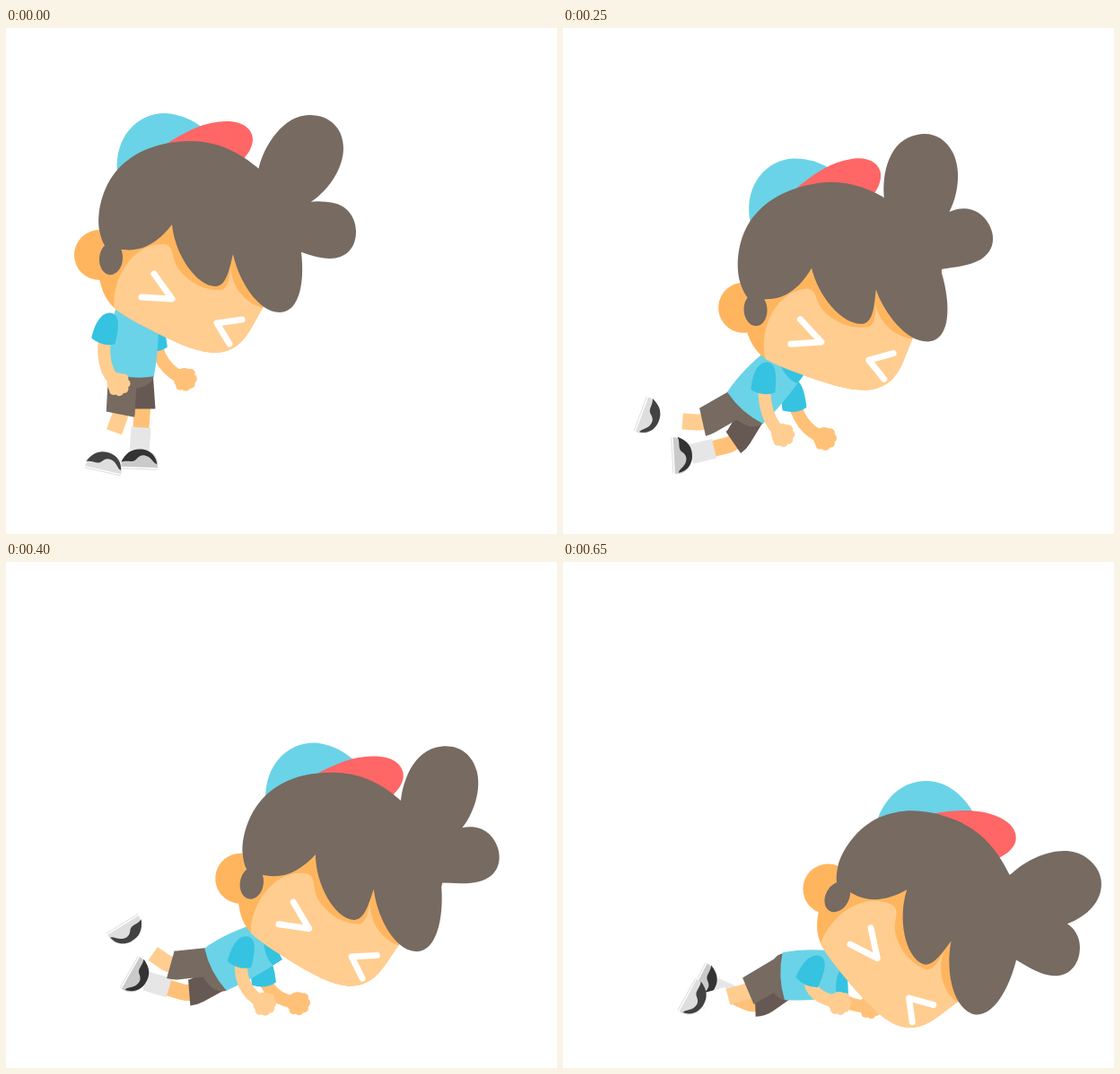
An HTML page with a canvas for the animation above (0.75 s loop, 614 px wide and 564 px high).

```html
<!DOCTYPE html>
<html lang="en">
<head>
<meta charset="utf-8">
<title>Falling boy</title>
<style>
  html, body { margin: 0; width: 100%; height: 100%; overflow: hidden; background: #fff; }
  canvas { display: block; }
</style>
</head>
<body>
<canvas id="stage" width="614" height="564"></canvas>
<script>
const ctx = document.getElementById('stage').getContext('2d');
const LOOP = 750, STEP = 50, LANDING = 450, END = 650;
const { sin, cos, atan2, min, max, PI } = Math;
const RAD = PI / 180;

const HAIR = '#766a61', SHORTS_DARK = '#665852';
const SKIN = '#ffcd90', SKIN_BACK = '#ffc177', SKIN_SHADE = '#ffb55e';
const BLUE = '#6ad3e7', BLUE_DARK = '#35c3e1', RED = '#ff6666';

const SHAPES = {
  capBlue: 'M124 162C120 123 145 95 177 95C194 96 207 102 219 111L200 140Z',
  capRed: 'M176 131C200 115 222 104 246 104C266 104 275 114 275 125C274 134 270 140 263 148L207 145Z',
  face: 'M102 240C101 275 105 299 122 313C137 325 155 333 172 342C195 353 215 362 234 362C266 360 272 334 288 309L260 225L130 200Z',
  faceLight: 'M121 313C117 282 140 240 175 241C190 242 182 257 195 272C207 286 224 293 240 292C248 290 250 277 250 262C250 284 262 305 286 312C272 334 266 360 234 362C215 362 195 353 172 342C155 333 137 325 121 313Z',
  hair: 'M283 158C260 138 235 126 205 126C168 127 143 138 125 157C106 178 101 208 104 225C106 236 109 242 113 246L131 247C154 250 172 236 185 219C188 252 212 288 234 288C246 287 249 268 253 252C259 281 281 317 305 317C328 317 334 280 328 243C334 210 325 185 283 158Z',
  tuftBig: 'M281 159C287 130 310 97 338 97C362 97 376 113 376 134C376 156 360 180 341 193L310 215L270 190Z',
  tuftSmall: 'M325 196C343 192 354 193 365 195C380 198 390 211 390 227C390 246 378 257 361 257C350 257 338 253 327 249L300 240L300 200Z',
  shirt: 'M-24 -8L24 -8C27 18 28 42 26 63Q0 70 -27 63C-30 42 -29 20 -24 -8Z',
  collar: 'M-18 -8L24 -8L25 4C14 8 -3 4 -18 -8Z',
  sleeve: 'M-14 15C-14 -4 -8 -17 2 -17C11 -17 14 -5 13 16Q0 22 -14 15Z',
  shoe: 'M-20 19C-19 8 -10 -1 3 -1C16 0 22 9 21 19Z',
  shoeTop: 'M-20 14C-15 3 -8 -2 3 -1C13 0 19 7 20 15C16 14 15 10 10 7C4 4 0 6 -3 10C-7 15 -13 11 -20 14Z'
};
for (const name in SHAPES) SHAPES[name] = new Path2D(SHAPES[name]);

function fill(name, color) {
  ctx.fillStyle = color;
  ctx.fill(SHAPES[name]);
}

function oval(x, y, rx, ry, color, turn = 0) {
  ctx.fillStyle = color;
  ctx.beginPath();
  ctx.ellipse(x, y, rx, ry, turn * RAD, 0, 2 * PI);
  ctx.fill();
}

function stroke(width, color, cap, trace) {
  ctx.strokeStyle = color;
  ctx.lineWidth = width;
  ctx.lineCap = cap;
  ctx.lineJoin = 'round';
  ctx.beginPath();
  trace();
  ctx.stroke();
}

function line(width, color, cap, ...points) {
  stroke(width, color, cap, () => points.forEach(p => ctx.lineTo(...p)));
}

function at([x, y], degrees, draw) {
  ctx.save();
  ctx.translate(x, y);
  ctx.rotate(degrees * RAD);
  draw();
  ctx.restore();
}

function turnAbout(x, y, degrees, draw) {
  at([x, y], degrees, () => { ctx.translate(-x, -y); draw(); });
}

// A point given in the frame of a joint that is turned by some degrees.
function from([x, y], degrees, dx, dy) {
  const c = cos(degrees * RAD), s = sin(degrees * RAD);
  return [x + dx * c - dy * s, y + dx * s + dy * c];
}

function leg(hip, { thigh, shin, thighAngle, shinAngle, footAngle, width, skin, sock, shoe, top, shorts }) {
  const knee = from(hip, thighAngle, 0, thigh);
  const ankle = from(knee, shinAngle, 0, shin);
  const part = (width, color, start, length) => {
    ctx.setLineDash([0, start, length, 999]);
    stroke(width, color, 'butt', () => {
      ctx.moveTo(...hip);
      ctx.arcTo(...knee, ...ankle, 22);
      ctx.lineTo(...ankle);
    });
    ctx.setLineDash([]);
  };
  part(18, skin, 0, 999);
  part(22, sock, thigh + shin * 0.45, 999);
  at(ankle, footAngle, () => {
    fill('shoe', shoe);
    fill('shoeTop', top);
    line(1, '#dedede', 'butt', [-20, 21], [21, 21]);
  });
  part(width, shorts, 0, thigh);
}

function arm(shoulder, upper, upperAngle, fore, foreAngle, skin) {
  const elbow = from(shoulder, upperAngle, 0, upper);
  const hand = from(elbow, foreAngle, 0, fore);
  stroke(14, skin, 'round', () => {
    ctx.moveTo(...shoulder);
    ctx.quadraticCurveTo(...elbow, ...hand);
  });
  oval(...hand, 12, 12, skin);
  for (let a = -40; a <= 120; a += 40) oval(...from(hand, a, 9, 0), 5, 5, skin);
  at(shoulder, upperAngle, () => fill('sleeve', BLUE_DARK));
}

function drawHead(center, angle, tuftBig, tuftSmall) {
  at(center, angle, () => {
    ctx.translate(-192.4, -271);
    fill('capBlue', BLUE);
    fill('capRed', RED);
    oval(104, 253, 28, 28, SKIN_SHADE);
    fill('face', SKIN_SHADE);
    fill('faceLight', SKIN);
    turnAbout(300, 178, tuftBig, () => fill('tuftBig', HAIR));
    turnAbout(302, 219, tuftSmall, () => fill('tuftSmall', HAIR));
    fill('hair', HAIR);
    oval(117, 257, 13, 18, HAIR, 5);
    line(7, '#fff', 'round', [165, 274], [185, 302], [151, 300]);
    line(7, '#fff', 'round', [263, 325], [235, 329], [249, 352]);
  });
}

function drawScene(t) {
  ctx.fillStyle = '#fff';
  ctx.fillRect(0, 0, 614, 564);

  // The boy falls until the landing, then settles on the ground.
  const fall = min(t / LANDING, 1);
  const settle = sin(max(0, (t - LANDING) / (END - LANDING)) * PI / 2);
  const sway = sin(2 * PI * fall);
  const arc = sin(PI * fall);
  const lag = sin(2 * fall);
  const swing = sin(fall * PI / 2) ** 1.4;
  const kick = fall ** 0.7;
  const tuck = fall ** 4;

  const head = [192.4 + 177 * fall ** 0.97 + 4 * sway, 271 + 132 * fall ** 1.75 + 13 * settle];
  const tilt = 57 * fall * (fall - 0.79) + 11.4 * settle;
  const neck = from(head, tilt, -47 - 7 * lag + 15 * settle, 52 + 12 * settle);
  const lean = 6 + 66.5 * fall + 4 * sway + 15 * settle;
  const onTorso = (x, y) => from(neck, lean, x, y);

  arm(onTorso(21 + 9 * arc - 15 * settle, 17 - 8 * settle),
    39 - 8 * tuck, -9, 30 + 7 * tuck, -70 - 30 * tuck - 6 * sway + 8 * settle, SKIN_BACK);
  leg(onTorso(10, 60), {
    thigh: 41, thighAngle: -4 + 76 * fall ** 1.3 - 17 * settle,
    shin: 46 + 6 * kick, shinAngle: 4 + 105 * swing + 6 * settle,
    footAngle: 2 + 128 * kick - 13 * settle,
    width: 29, skin: SKIN_BACK, sock: '#e6e6e6', shoe: '#cacaca', top: '#333', shorts: SHORTS_DARK
  });
  oval(...onTorso(0, 62), 26, 17, HAIR, lean);
  leg(onTorso(-9, 60), {
    thigh: 49, thighAngle: 3 + 83 * swing - 27 * settle,
    shin: 46 + 6 * kick, shinAngle: 20 + 107 * swing - 52 * settle,
    footAngle: 13 + 147 * kick - 41 * settle,
    width: 32, skin: SKIN, sock: '#fff', shoe: '#dedede', top: '#424242', shorts: HAIR
  });
  at(neck, lean, () => {
    fill('shirt', BLUE);
    fill('collar', BLUE_DARK);
  });
  arm(onTorso(-32 + 28 * lag, 14.5 + 13 * kick + 3 * settle),
    46 - 6 * tuck - 9 * settle, 12 + 5 * fall - 11 * arc + 5 * settle,
    28 + 14 * tuck, -52 - 27 * tuck - 10 * sway, SKIN);
  drawHead(head, tilt, -21 * lag + 31 * settle, -22 * lag + 8 * settle);
}

function tick() {
  const t = performance.now() % LOOP;
  drawScene(min(Math.floor(t / STEP) * STEP, END));
  requestAnimationFrame(tick);
}
tick();
</script>
</body>
</html>
```
